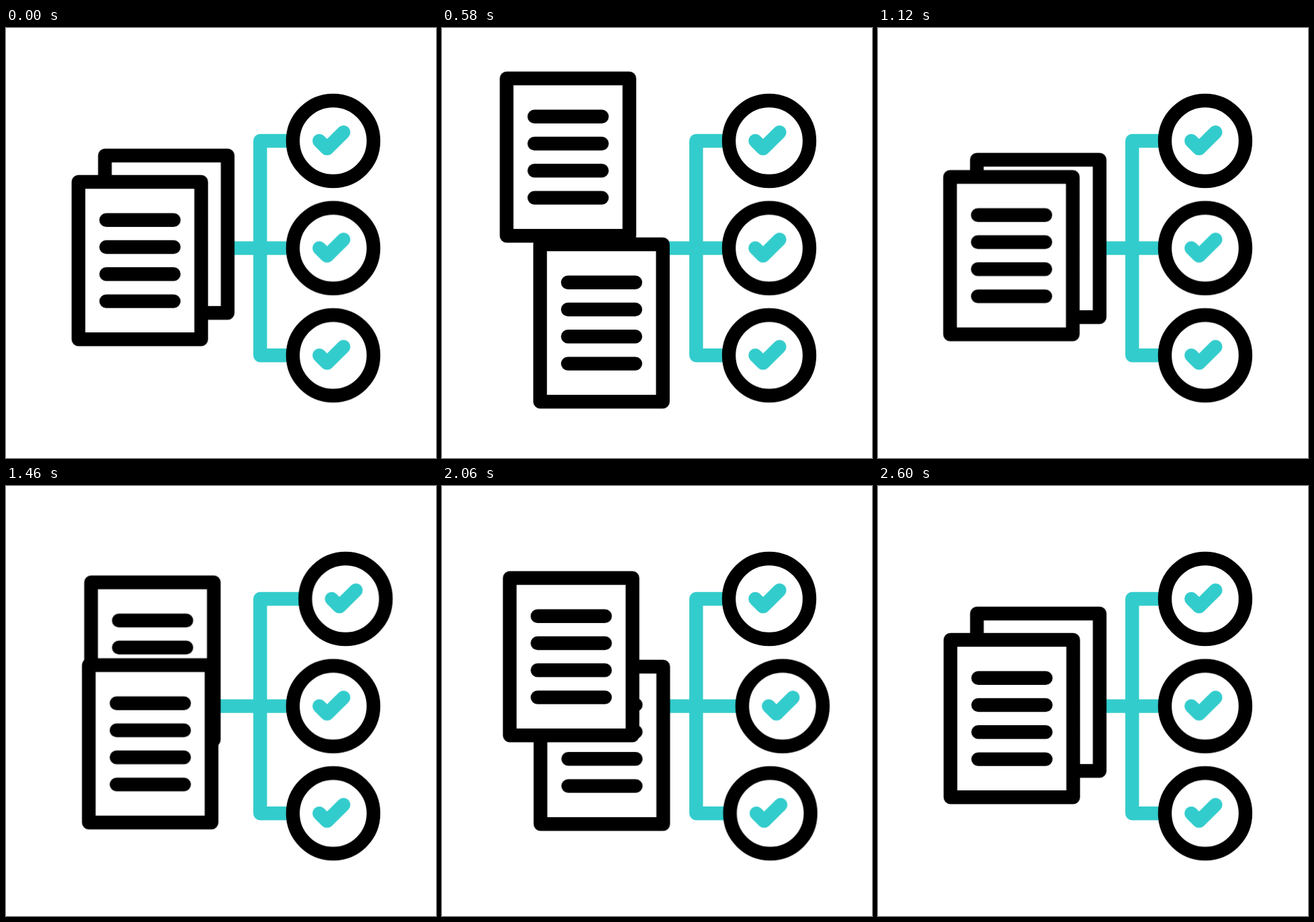
Recreate the animation shown at these times as an HTML page. Size 640 by 640 pixels, loop 2.62 s.

```html
<!DOCTYPE html>
<html lang="en">
<head>
<meta charset="utf-8">
<title>Document distribution</title>
<style>
  html, body { margin: 0; width: 100%; height: 100%; overflow: hidden; background: #fff; }
  svg { display: block; width: 100%; height: 100%; }
  svg * { stroke-width: 20.4; stroke-linecap: round; stroke-linejoin: round; }
  .ink { stroke: #000; fill: #fff; }
  .teal { stroke: #33cccc; fill: none; }
</style>
</head>
<body>
<svg viewBox="0 0 640 640">
  <defs>
    <g id="paper" class="ink">
      <rect width="182.7" height="234.3"/>
      <path d="M41.3 56.7h100.5M41.3 97h100.5M41.3 137.3h100.5M41.3 177.6h100.5"/>
    </g>
    <g id="badge">
      <circle class="ink" r="60"/>
      <path class="teal" d="M-20.6 0L-9.1 11.4L15.4-12.8"/>
    </g>
  </defs>
  <path class="teal" d="M450 168H378.3V487.3H450M312 327.6H450"/>
  <g id="back"><use href="#paper"/></g>
  <g id="front"><use href="#paper"/></g>
  <g class="node"><use href="#badge"/></g>
  <g class="node"><use href="#badge"/></g>
  <g class="node"><use href="#badge"/></g>
</svg>
<script>
  const LOOP = 2620;
  const HALF = 600;
  const EASE = 'cubic-bezier(.3333, 0, .6667, 1)';

  const pose = {
    front: [107.8, 229],
    back: [147.2, 189.8],
    high: [96, 74.7],
    low: [146.1, 322.2]
  };

  // steps: [time in ms, [x, y]]
  function play(el, steps) {
    const frames = steps.map(([time, [x, y]]) => ({
      offset: time / LOOP,
      transform: `translate(${x}px, ${y}px)`,
      easing: EASE
    }));
    el.animate(frames, { duration: LOOP, iterations: Infinity }).startTime = 0;
  }

  // The sheets trade layers at their far points, so each layer jumps there.
  function shuffle(id, leave, enter) {
    const home = pose[id];
    const steps = [[0, home]];
    for (const start of [0, 2 * HALF]) {
      steps.push(
        [start + HALF, pose[leave]],
        [start + HALF, pose[enter]],
        [start + 2 * HALF, home]
      );
    }
    steps.push([LOOP, home]);
    play(document.getElementById(id), steps);
  }

  shuffle('front', 'low', 'high');
  shuffle('back', 'high', 'low');

  document.querySelectorAll('.node').forEach((el, i) => {
    const start = 1200 + 400 * i;
    const home = [486.9, 168 + 159.6 * i];
    const out = [home[0] + 25.6, home[1]];
    play(el, [[0, home], [start, home], [start + 400, out], [start + 600, home], [LOOP, home]]);
  });
</script>
</body>
</html>
```
